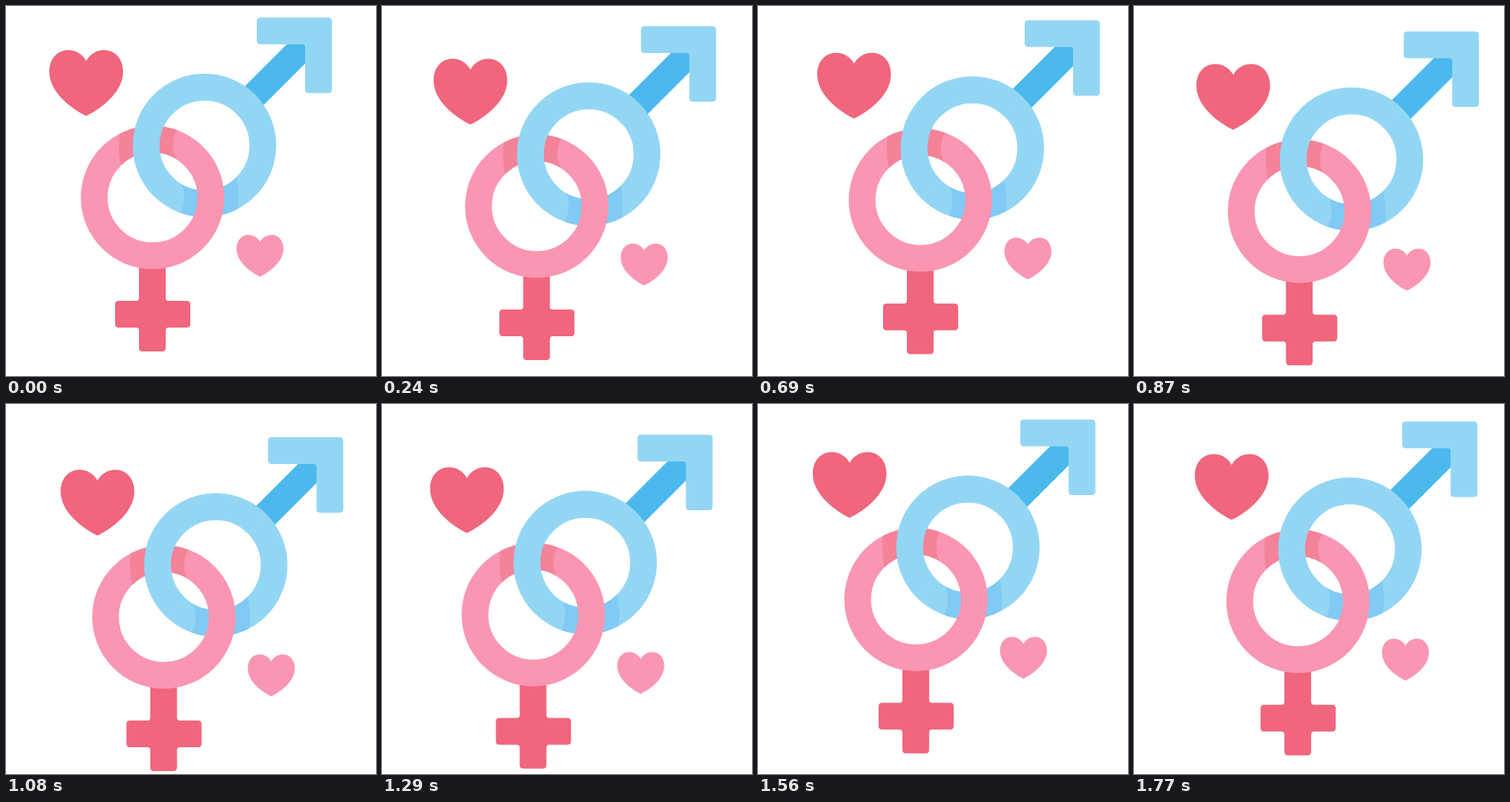
An HTML page that plays this animation: 512x512 px, repeating every 1.8 s.

```html
<!DOCTYPE html>
<html lang="en">
<head>
<meta charset="utf-8">
<title>Linked rings</title>
<style>
  html, body { margin: 0; width: 100%; height: 100%; overflow: hidden; background: #fff; }
  svg { display: block; width: 100%; height: 100%; }
  .ring { fill: none; stroke-width: 37; }
  .shade { fill: none; stroke-width: 75; }
</style>
</head>
<body>
<svg viewBox="0 0 512 512">
  <defs>
    <path id="heart" d="M0 91C-21 81-51 58-51 30C-51 11-39 0-25 0C-14 0-5 6 0 15C5 6 14 0 25 0C39 0 51 11 51 30C51 58 21 81 0 91Z"/>
    <circle id="male" cx="274.7" cy="192.9" r="80.7"/>
    <circle id="female" cx="202.8" cy="264.9" r="80.7"/>
    <!-- halves on either side of the line through both centres -->
    <clipPath id="upper"><path d="M0 0H468L0 468Z"/></clipPath>
    <clipPath id="lower"><path d="M468 0V468H0Z"/></clipPath>
    <mask id="onMale" maskUnits="userSpaceOnUse" x="0" y="0" width="512" height="512">
      <use href="#male" class="ring" stroke="#fff"/>
    </mask>
    <mask id="onFemale" maskUnits="userSpaceOnUse" x="0" y="0" width="512" height="512">
      <use href="#female" class="ring" stroke="#fff"/>
    </mask>
  </defs>
  <g id="scene">
    <use href="#heart" x="111" y="61" fill="#f0667d"/>
    <use href="#heart" transform="translate(351.5 316.7) scale(.637)" fill="#fa96b2"/>

    <path d="M325 142.5L422 45.5" stroke="#4bb9ed" stroke-width="36.8"/>
    <path fill="#93d6f4" d="M352 16H446q5 0 5 5V115.5q0 5-5 5H419q-5 0-5-5V57q0-4-4-4H352q-5 0-5-5V21q0-5 5-5Z"/>
    <path fill="#f0667d" d="M184 350V404q0 4-4 4H156q-5 0-5 5V440q0 5 5 5H180q4 0 4 4V473q0 5 5 5H216q5 0 5-5V449q0-4 4-4H250q5 0 5-5V413q0-5-5-5H225q-4 0-4-4V350Z"/>

    <use href="#male" class="ring" stroke="#93d6f4"/>
    <g clip-path="url(#lower)"><g mask="url(#onMale)">
      <circle class="shade" cx="203" cy="265" r="81.5" stroke="#80caf4"/>
    </g></g>
    <use href="#female" class="ring" stroke="#fa96b2"/>
    <g clip-path="url(#upper)">
      <g mask="url(#onFemale)">
        <circle class="shade" cx="275" cy="193" r="81.5" stroke="#f48399"/>
      </g>
      <use href="#male" class="ring" stroke="#93d6f4"/>
    </g>
  </g>
</svg>
<script>
const LOOP = 1800, STEP = 30;
const scene = document.getElementById('scene');

// Turning points of the drift: [time in ms, offset in px]
const driftX = [[0, 0], [270, 11.7], [480, 12.5], [825, 26.7], [1305, 6.5], [LOOP, 24.3]];
const driftY = [[0, 0], [320, 14.2], [650, 3], [1040, 29.9], [1180, 30], [1650, 3.2], [LOOP, 8.7]];

// Cosine ease from one turning point to the next
function sample(points, t) {
  const i = points.findIndex(([time]) => time > t);
  const [t0, v0] = points[i - 1], [t1, v1] = points[i];
  return v0 + (v1 - v0) * (1 - Math.cos(Math.PI * (t - t0) / (t1 - t0))) / 2;
}

const start = performance.now();
function draw() {
  const elapsed = (performance.now() - start) % LOOP;
  const t = Math.floor(elapsed / STEP) * STEP;
  scene.setAttribute('transform', `translate(${sample(driftX, t)} ${sample(driftY, t)})`);
  requestAnimationFrame(draw);
}
draw();
</script>
</body>
</html>
```
